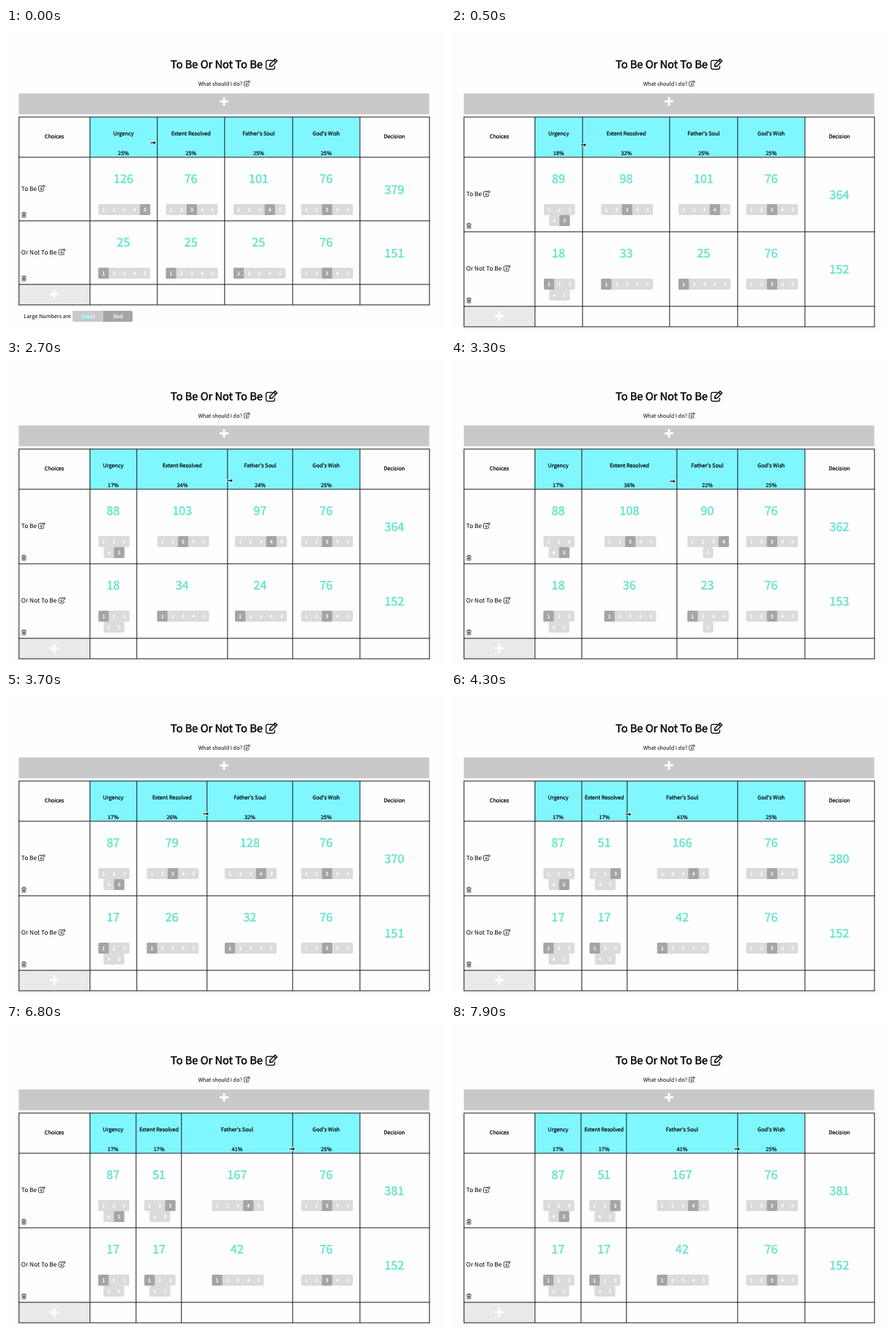
An HTML page for the animation above (8 s loop, 600 by 416 pixels).

```html
<!DOCTYPE html>
<html lang="en">
<head>
<meta charset="utf-8">
<title>Decision table</title>
<style>
html, body { margin: 0; width: 100%; height: 100%; overflow: hidden; background: #fefefe; }
svg { display: block; width: 600px; height: 416px; }
text {
  font-family: "Noto Sans CJK SC", "Noto Sans CJK JP", "Noto Sans CJK", "Source Sans Pro", "Open Sans", sans-serif;
  text-rendering: geometricPrecision;
}
</style>
</head>
<body>
<svg id="stage" viewBox="0 0 600 416"></svg>
<script>
const stage = document.getElementById("stage");
const LOOP = 8000, STEP = 100;
const LEFT = 17.5, X0 = 114, RIGHT = 578.5, TOP = 121.5, HEAD = 176.5;
const COL = 92.4, BUTTON = 14.2, BUTTON_H = 15;
const CYAN = "#80f6ff", MINT = "#66e4c9", LIGHT = "#dcdbdc", DARK = "#a6a5a6";

const criteria = ["Urgency", "Extent Resolved", "Father's Soul", "God's Wish"];
const choices = [
  { name: "To Be", iconX: 44, scores: [5, 3, 4, 3] },
  { name: "Or Not To Be", iconX: 71.7, scores: [1, 1, 1, 3] }
];

// time, weight of first column, weight of second column
const weightKeys = [
  [0, 92.4, 92.4], [500, 65.3, 119.5], [1100, 65, 119.8], [2200, 64.5, 120.3],
  [2700, 64, 124.95], [3000, 64, 131.5], [3300, 64, 131],
  [4100, 63.85, 62.1], [4300, 63.85, 61.7], [4600, 63.5, 61.55]
];
// time, x, y
const cursorKeys = [
  [0, 201, 157], [500, 181, 160], [1100, 180, 161], [2000, 298, 164],
  [2300, 301, 165], [2700, 306, 165], [3000, 311, 166], [3300, 302.7, 166],
  [4100, 244, 167.4], [4300, 242.3, 167.4], [4800, 242.3, 167.4], [5600, 322, 172],
  [5900, 322, 172], [6800, 391, 171]
];

function sample(keys, t) {
  const i = keys.findIndex(k => k[0] > t);
  if (i < 0) return keys[keys.length - 1].slice(1);
  const a = keys[i - 1], b = keys[i], p = (t - a[0]) / (b[0] - a[0]);
  return a.slice(1).map((v, j) => v + (b[j + 1] - v) * p);
}

const snap = v => Math.floor(v) + 0.5;

const rect = (x, y, w, h, fill, r = 0) =>
  `<rect x="${x}" y="${y}" width="${w}" height="${h}" rx="${r}" fill="${fill}"/>`;

// "bold" thickens the outline without changing the advance widths
const text = (s, x, y, size, { fill = "#000", anchor = "middle", bold = 0 } = {}) =>
  `<text x="${x}" y="${y}" font-size="${size}" text-anchor="${anchor}" fill="${fill}" stroke="${fill}" stroke-width="${bold}">${s}</text>`;

const line = (x1, y1, x2, y2) => `M${x1} ${y1}L${x2} ${y2}`;

const plus = (x, y) =>
  `<path d="M${x - 6} ${y}h12M${x} ${y - 6}v12" stroke="#fff" stroke-width="2.8"/>`;

const editIcon = (x, y, size) =>
  `<g transform="translate(${x} ${y}) scale(${size / 16})" fill="none" stroke="#000" stroke-width="1.2">
    <path d="M12 9.8v2.4a2 2 0 0 1-2 2H2.8a2 2 0 0 1-2-2V4.8a2 2 0 0 1 2-2h6.6"/>
    <path d="M5.6 10.6V7.9L12.5 1l2.7 2.7-6.9 6.9z" fill="#fefefe"/>
    <path d="M10.8 2.7l2.7 2.7M5.6 9l1.6 1.6" stroke-width="1.5"/>
  </g>`;

const trashIcon = (x, y) =>
  `<path transform="translate(${x} ${y})" d="M0 1.8H6.6M2.2 1.6V.5H4.4V1.6M.9 2V7.6H5.7V2M2.4 3.3V6.3M3.3 3.3V6.3M4.2 3.3V6.3" fill="none" stroke="#222" stroke-width=".7"/>`;

function scoreButtons(cx, y, width, score) {
  const perRow = Math.max(1, Math.min(5, Math.floor((width - 15) / BUTTON)));
  let out = "";
  for (let first = 1; first <= 5; first += perRow, y += BUTTON_H) {
    const n = Math.min(perRow, 6 - first), x = cx - n * BUTTON / 2;
    out += rect(x, y, n * BUTTON, BUTTON_H, LIGHT, 2);
    for (let i = 0; i < n; i++) {
      if (first + i === score) out += rect(x + i * BUTTON, y, BUTTON, BUTTON_H, DARK, 1.5);
      out += text(first + i, x + (i + 0.5) * BUTTON, y + 10, 6.4, { fill: "#fff", bold: 0.3 });
    }
  }
  return out;
}

function cursor(x, y, edges) {
  const at = `transform="translate(${x} ${y})"`;
  if (edges.some(e => Math.abs(e - x) <= 7))
    return `<path ${at} d="M-4-1.1H.8V-2.9L4.4 0 .8 2.9V1.1H-4z" fill="#111" stroke="#fff" stroke-width=".8"/>`;
  if (x > 305 && x < 326 && y > 167)
    return `<path ${at} d="M-2-4.5Q0-4.5 0-3.2Q0-4.5 2-4.5M0-3.2V3.2M-2 4.5Q0 4.5 0 3.2Q0 4.5 2 4.5M-1 1.5H1" fill="none" stroke="#111" stroke-width=".9"/>`;
  return `<path ${at} d="M0 0V9L2.1 7.1 3.5 10.2 4.9 9.6 3.5 6.6H6.3z" fill="#111" stroke="#fff" stroke-width=".7"/>`;
}

function footer(y) {
  return text("Large Numbers are", 24.5, y + 9.5, 7.3, { anchor: "start" }) +
    rect(91, y, 82, 15, DARK, 2) + rect(91, y, 42, 15, "#cac9ca", 2) +
    rect(104, y + 4, 12, 9, "rgba(128,230,235,.55)") +
    text("Good", 112.5, y + 10, 7.2, { fill: "#fff" }) +
    text("Bad", 153, y + 10, 7.2, { fill: "#fff", bold: 0.2 });
}

function draw(t) {
  const [w1, w2] = sample(weightKeys, t);
  const weights = [w1, w2, 3 * COL - w1 - w2, COL];
  // the layout evens the columns out a little
  const widths = weights.map(w => w + (COL - w) * 0.015);
  const edges = [X0];
  widths.forEach((w, i) => edges.push(edges[i] + w));
  const end = edges[4], mid = i => (edges[i] + edges[i + 1]) / 2;
  const rowH = Math.min(...widths) < 15 + 5 * BUTTON ? 102 : 87;
  const addTop = HEAD + 2 * rowH, bottom = addTop + 28;
  const decisionX = (end + RIGHT) / 2 - 0.3;

  let out = rect(0, 0, 600, 416, "#fefefe") +
    text("To Be Or Not To Be", 225, 55.3, 14.6, { anchor: "start", bold: 0.45 }) +
    editIcon(354.6, 41.4, 16.8) +
    text("What should I do?", 262.7, 78.5, 7.3, { anchor: "start" }) +
    editIcon(325, 71.4, 9) +
    rect(17.5, 89.5, 561, 28.5, "#cac9ca") + plus(298, 100.5) +
    rect(X0, TOP, end - X0, HEAD - TOP, CYAN) +
    rect(LEFT, addTop, X0 - LEFT, 28, "#ebeaeb") + plus(66, addTop + 14) +
    text("Choices", 66, 151.2, 7.3, { bold: 0.22 }) +
    text("Decision", decisionX, 151.2, 7.3, { bold: 0.22 });

  criteria.forEach((name, i) => {
    out += text(name, mid(i) + 0.3, 146.9, 7.3, { bold: 0.22 }) +
      text(Math.round(weights[i] / 3.681) + "%", mid(i) + 0.3, 173.7, 7.3, { bold: 0.22 });
  });

  choices.forEach(({ name, iconX, scores }, r) => {
    const top = HEAD + r * rowH, middle = top + rowH / 2;
    let total = 0;
    out += text(name, 20.8, middle + 2.6, 8.35, { anchor: "start" }) +
      editIcon(iconX, middle - 5.7, 10) + trashIcon(21.2, top + rowH - 12);
    scores.forEach((score, i) => {
      const points = Math.round(score * weights[i] / 3.653);
      total += points;
      out += text(points, mid(i) + 0.2, top + 35.1, 16.2, { fill: MINT, bold: 0.5 }) +
        scoreButtons(mid(i) + 1.4, top + 64.5, widths[i], score);
    });
    out += text(total, decisionX, middle + 6.6, 16.2, { fill: MINT, bold: 0.5 });
  });

  const rows = [TOP, HEAD, HEAD + rowH, addTop, bottom];
  const grid = rows.map(y => line(LEFT - 0.5, y, RIGHT + 0.5, y)).join("") +
    [LEFT, ...edges.map(snap), RIGHT].map(x => line(x, TOP, x, bottom)).join("");
  out += `<path transform="translate(.3 .4)" d="${grid}" stroke="#1a1a1a" fill="none"/>` + footer(bottom + 8.5);

  const [cx, cy] = sample(cursorKeys, t);
  stage.innerHTML = out + cursor(cx, cy, edges.slice(1, 4));
}

let shown = -1;
function tick() {
  const t = Math.floor(performance.now() % LOOP / STEP) * STEP;
  if (t !== shown) draw(shown = t);
  requestAnimationFrame(tick);
}
tick();
</script>
</body>
</html>
```
